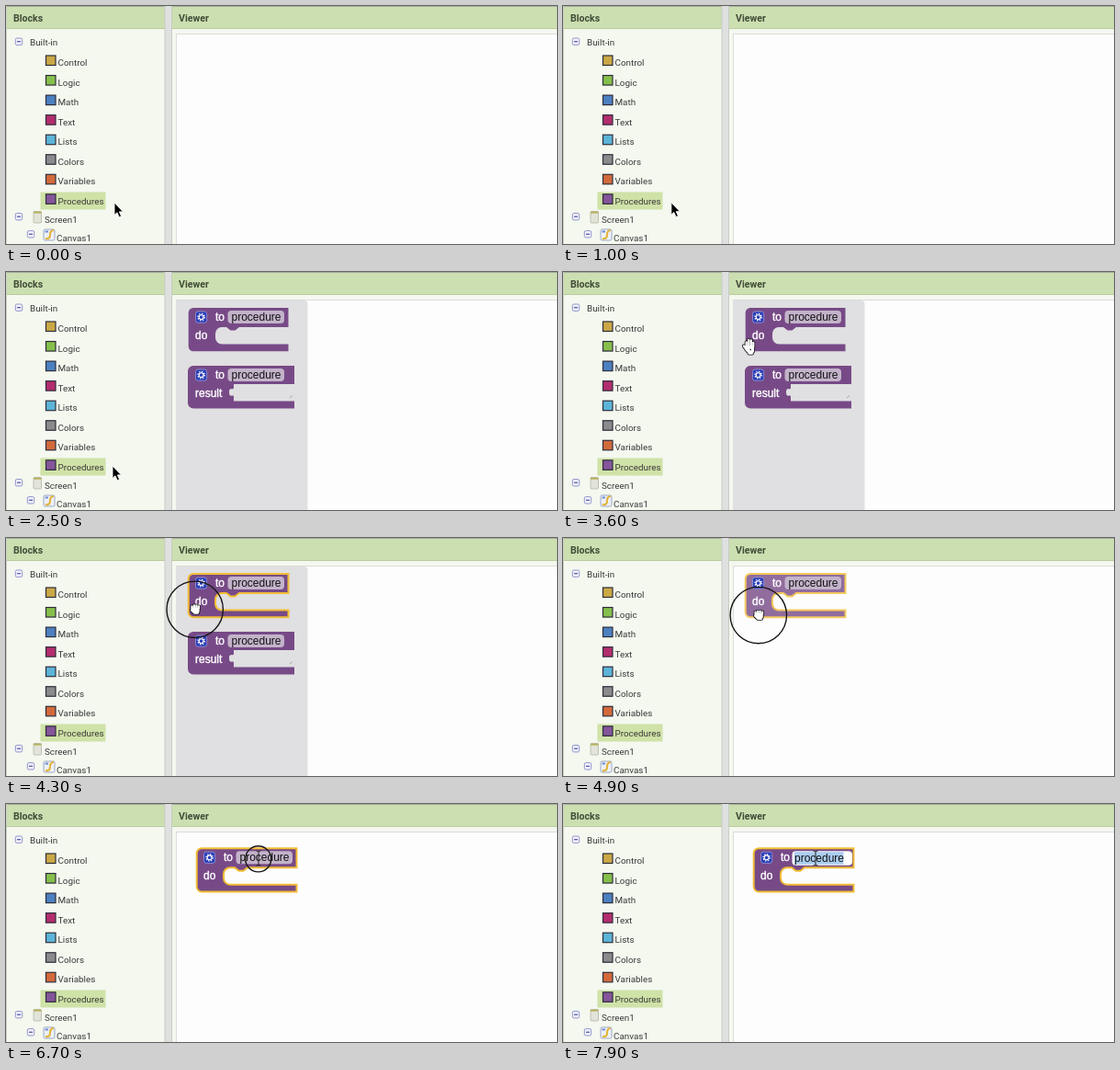
An HTML page for the animation above (8 s loop, 600 px wide and 259 px high).

```html
<!DOCTYPE html>
<html lang="en">
<head>
<meta charset="utf-8">
<title>Procedure block</title>
<style>
html, body { margin: 0; width: 100%; height: 100%; overflow: hidden; background: #f4f8ef; }
svg { display: block; width: 600px; height: 259px; }
text { font: 9.9px Roboto, sans-serif; fill: #3a3a3a; }
.head { font-size: 10.6px; font-weight: 700; fill: #414c37; }
.block text { font: 12px "Liberation Sans", Arial, sans-serif; fill: #fff; stroke: #fff; stroke-width: .4; }
.block text.name { fill: #111; stroke: none; }
.body { fill: #774a87; }
.field { fill: #c3b3ca; }
.selected .body { stroke: #f2bd35; stroke-width: 2; }
.dragging .body { opacity: .8; }
</style>
</head>
<body>
<svg viewBox="0 0 600 259">
  <defs>
    <g id="gear">
      <rect x="8.5" y="5" width="12.2" height="12.2" rx="2.5" fill="#2b3fb8" stroke="#9c9ad8" stroke-width=".8"/>
      <circle cx="14.6" cy="11.1" r="3.6" fill="none" stroke="#fff" stroke-width="1.4" stroke-dasharray="1.41"/>
      <circle cx="14.6" cy="11.1" r="2.4" fill="none" stroke="#fff" stroke-width="1.1"/>
    </g>
    <g id="minus">
      <rect x="-3.7" y="-3.7" width="7.4" height="7.4" rx="1.5" fill="#f2f2fc" stroke="#9295cb"/>
      <path d="M-2 0H2" stroke="#4d50a0" stroke-width="1.2"/>
    </g>
    <path id="open" d="M-3.3 0V-5M-.8 0V-7.5M1.8 0V-7M4.3 0V-4.5M-6-1L-2.5 4M-3 0H4V5H-1.5V1H3V7H-.5V3"/>
    <path id="fist" d="M-3.5 1V-2.5M-1 0V-3.5M1.5 0V-3.5M4-.5V-2.5M-4 1.5L-2 3.5M-3 0H3.5V3H-2V1H3V4.5H-1"/>
  </defs>

  <rect width="600" height="259" fill="#f4f8ef"/>
  <rect width="600" height="25" fill="#ccdfb1"/>
  <path d="M0 24.5H600" stroke="#b9cb9f"/>
  <path d="M0 .5H600" stroke="#a9b09f"/>
  <path d="M.5 0V259" stroke="#cbd1c4"/>
  <rect x="173" width="8" height="259" fill="#dfe1e0"/>
  <path d="M173 0V259M180.5 0V259" stroke="#c8ccc6"/>
  <rect x="185.5" y="30.5" width="420" height="235" fill="#fefdfe" stroke="#dcdddb"/>
  <text class="head" x="8" y="17.3">Blocks</text>
  <text class="head" x="188" y="17.3">Viewer</text>

  <rect x="37.5" y="202.5" width="71" height="19" fill="#cfe2a7"/>
  <g id="tree"></g>
  <use href="#minus" x="14" y="38.7"/>
  <use href="#minus" x="14" y="229.2"/>
  <use href="#minus" x="27" y="248.3"/>
  <text x="26" y="43">Built-in</text>
  <text x="42" y="236.2">Screen1</text>
  <text x="55" y="255.5">Canvas1</text>
  <rect x="30" y="223.5" width="8.5" height="12.5" rx="1" fill="#e2e4da" stroke="#b3b5a4" stroke-width=".8"/>
  <path d="M30 224.7H38.5" stroke="#b9b360" stroke-width="2"/>
  <rect x="41" y="243" width="12" height="12" rx="1.5" fill="#eef1f7" stroke="#8795b8" stroke-width=".8"/>
  <path d="M43 253Q48 254 48 249T52 244" fill="none" stroke="#e2b43c" stroke-width="2.2"/>
  <path d="M42.5 245.5H46" stroke="#6f8fd0" stroke-width="2"/>

  <g id="flyout">
    <path d="M185 31H324.5a4 4 0 0 1 4 4V259H185z" fill="#e0dfe1"/>
    <g class="block" transform="translate(198 101)">
      <path class="body" d="M6 1H116V21H50V24.5C50 29 45 23 45 30S50 31 50 35V39.5H116V47.5H6a6 6 0 0 1-6-6V7a6 6 0 0 1 6-6z"/>
      <path d="M111 36l3-2.5" stroke="#a9a5ab"/>
      <use href="#gear"/>
      <rect class="field" x="43.5" y="4" width="61.5" height="14" rx="4"/>
      <text x="30" y="15.3">to</text>
      <text class="name" x="47.5" y="15.3">procedure</text>
      <text x="8" y="35">result</text>
    </g>
  </g>

  <g id="block" class="block">
    <path class="body" d="M6 1H109.5V22H56l-4.5 3.5h-5L42 22H37a7 7 0 0 0-7 7V33.5a7 7 0 0 0 7 7H109.5V48.2H6a5.3 5.3 0 0 1-5.3-5.3V6.3a5.3 5.3 0 0 1 5.3-5.3z"/>
    <use href="#gear"/>
    <text x="30" y="15.3">to</text>
    <text x="8" y="35.3">do</text>
    <g id="label">
      <rect class="field" x="43.5" y="4" width="61.5" height="14" rx="4"/>
      <text class="name" x="47.5" y="15.3">procedure</text>
    </g>
    <g id="editor">
      <rect x="42.5" y="4" width="65.5" height="15.5" rx="4" fill="#fff"/>
      <rect x="45" y="5" width="53.5" height="13.5" fill="#abcdf0"/>
      <text class="name" x="45" y="15.5">procedure</text>
    </g>
  </g>

  <circle id="ring" fill="none" stroke="#161616" stroke-width="1.4"/>
  <g id="cursor">
    <path id="arrow" d="M0 0V13.5L3 10.8 5.2 15.8 7.6 14.7 5.4 9.9H9.5z" fill="#000" stroke="#fff" stroke-width=".9"/>
    <g id="openHand"></g>
    <g id="closedHand"></g>
    <path id="beam" d="M-2.5-8Q0-8 0-6.5V6.5Q0 8-2.5 8M2.5-8Q0-8 0-6.5M0 6.5Q0 8 2.5 8" fill="none" stroke="#222"/>
  </g>
</svg>
<script>
const $ = id => document.getElementById(id);
const show = (id, on) => $(id).setAttribute('visibility', on ? 'visible' : 'hidden');
const move = (id, [x, y]) => $(id).setAttribute('transform', `translate(${x} ${y})`);

const drawers = {
  Control: '#cba846', Logic: '#86bf4c', Math: '#4c80c0', Text: '#b32d6e',
  Lists: '#5cb4d8', Colors: '#8b8b8d', Variables: '#d26a3c', Procedures: '#84559a'
};
$('tree').innerHTML = Object.entries(drawers).map(([name, color], i) => {
  const y = 54 + i * 21.55;
  return `<rect x="43.5" y="${y}" width="10.5" height="10.5" fill="${color}" stroke="#2d2d3a" stroke-width="1.2"/>
    <text x="56.5" y="${y + 11}">${name}</text>`;
}).join('');

// A thick dark stroke under a thin white one gives an outlined hand.
const handOf = shape => [['#111', 4], ['#fff', 2.3]].map(([color, width]) =>
  `<use href="#${shape}" fill="none" stroke="${color}" stroke-width="${width}" stroke-linecap="round" stroke-linejoin="round"/>`).join('');
$('openHand').innerHTML = handOf('open');
$('closedHand').innerHTML = handOf('fist');

// keys: [time, x, y]
const pointer = [[0, 118, 214], [900, 118, 214], [1500, 116, 211], [2800, 116, 211], [3700, 206, 77],
  [4400, 206, 77], [4850, 213, 83], [5200, 215, 87], [5850, 215, 87], [6500, 275, 59]];
const blockPath = [[0, 198, 38], [4950, 198, 38], [5200, 207, 47.2]];
const presses = [[1700, 2000], [3800, 5450], [6700, 7000]];

function at(keys, t) {
  const i = keys.findIndex(k => k[0] > t);
  if (i < 0) return keys[keys.length - 1].slice(1);
  const [t0, x0, y0] = keys[i - 1], [t1, x1, y1] = keys[i];
  const u = (t - t0) / (t1 - t0), e = u * u * (3 - 2 * u);
  return [x0 + (x1 - x0) * e, y0 + (y1 - y0) * e];
}

function draw(t) {
  const [x, y] = at(pointer, t);
  const editing = t >= 6900, dragging = t >= 4700 && t < 5400;
  const press = presses.find(([from, to]) => t >= from && t < to);
  const kind = x < 185 ? 'arrow' : x >= 250 ? 'beam' : press ? 'closedHand' : 'openHand';
  move('cursor', [x, y]);
  for (const id of ['arrow', 'beam', 'closedHand', 'openHand']) show(id, id === kind);

  show('ring', press);
  if (press) {
    $('ring').setAttribute('r', Math.min(30.7, 14 + (t - press[0]) * .04));
    move('ring', [x - .3, y + .8]);
  }

  show('flyout', t >= 2200 && t < 4700);
  show('block', t >= 2200);
  move('block', at(blockPath, t));
  $('block').classList.toggle('selected', t >= 3900);
  $('block').classList.toggle('dragging', dragging);
  $('label').style.display = editing ? 'none' : '';
  $('editor').style.display = editing ? '' : 'none';
}

const start = performance.now();
function tick() {
  draw((performance.now() - start) % 8000);
  requestAnimationFrame(tick);
}
tick();
</script>
</body>
</html>
```
